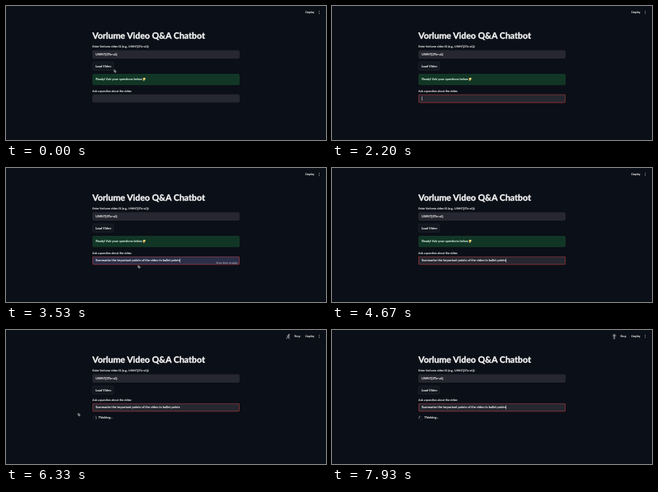
These frames come from a looping animation (400x168 px, 8 s). An HTML page:

```html
<!DOCTYPE html>
<html lang="en">
<head>
<meta charset="utf-8">
<title>Video Q&amp;A Chatbot</title>
<style>
html, body { margin: 0; width: 100%; height: 100%; overflow: hidden; background: #0b0f17; }

/* Laid out at four times the stage size, then scaled down. */
#app {
  position: absolute; left: 0; top: 0; width: 1600px; height: 672px;
  transform: scale(.25); transform-origin: 0 0;
  font: 500 16px Lato, "Open Sans", sans-serif; color: #fafafa;
  -webkit-text-stroke: .35px; text-rendering: geometricPrecision; white-space: nowrap;
}
#app div, #app svg { position: absolute; box-sizing: border-box; }
#app .t { line-height: 0; }
#app .small { font-size: 14.2px; }
.box { left: 432px; width: 736px; height: 42px; border-radius: 8px; background: #262730; }

h1 { position: absolute; margin: 0; left: 432px; top: 149px; line-height: 0; font-size: 43.7px; font-weight: 700; -webkit-text-stroke: 1.2px; }
#load { left: 432px; top: 280px; width: 107px; height: 42px; border: 1px solid #41444c; border-radius: 8px; background: #131720; }
#ready { left: 432px; top: 340px; width: 736px; height: 57px; border-radius: 8px; background: #123626; color: #dffde9; }
#hint { right: 8px; top: 30px; font-size: 12.2px; color: #a5a8b5; }

.caret { position: absolute; top: -10px; height: 20px; border-left: 2px solid #fafafa; }

#ready, #ask, #field, #first, #last, #query, #hint, #busy, #wait, #mouse { animation: 8s step-end infinite; }
#ready { animation-name: ready; }
#ask { left: 0; top: 0; animation-name: shift; }
#field { top: 443px; border: 2px solid transparent; animation-name: focus, autofill; animation-timing-function: linear, step-end; }
#first { animation-name: first; }
#last { animation-name: last; }
#query { animation-name: query; }
#hint { animation-name: hint; }
#busy, #wait { animation-name: busy; }
#mouse { left: 0; top: 0; overflow: visible; animation-name: seen, travel; animation-timing-function: step-end, linear; }

#ring {
  left: 434px; top: 431px; width: 19px; height: 19px; border-radius: 50%;
  border: 2.6px solid #30343d; border-top-color: #d0d2d6;
  animation: spin 1s -.9s linear infinite;
}
.pose { opacity: 0; animation: pose 666.667ms step-end infinite; animation-delay: calc(-870ms + var(--i) * 133.333ms); }

@keyframes ready { 0% { visibility: visible } 60.875%, 100% { visibility: hidden } }
@keyframes shift { 0% { transform: none } 60.875%, 100% { transform: translateY(-76px) } }
@keyframes focus { 0%, 14.125% { border-color: transparent } 17%, 100% { border-color: #ff4b4b } }
@keyframes autofill { 0% { background-color: #262730 } 38.375% { background-color: #2b2f47 } 57.5%, 100% { background-color: #262730 } }
@keyframes first { 0% { opacity: 0 } 14.125% { opacity: 1 } 20.875% { opacity: 0 } 27.5% { opacity: 1 } 34.125%, 100% { opacity: 0 } }
@keyframes last {
  0% { opacity: 0 } 44.125% { opacity: 1 } 50.875% { opacity: 0 } 57.5% { opacity: 1 } 64.125% { opacity: 0 }
  70.8% { opacity: 1 } 77.5% { opacity: 0 } 84.1% { opacity: 1 } 90.8% { opacity: 0 } 97.5%, 100% { opacity: 1 }
}
@keyframes query { 0% { visibility: hidden } 38.375%, 100% { visibility: visible } }
@keyframes hint { 0% { visibility: hidden } 44.125% { visibility: visible } 57.5%, 100% { visibility: hidden } }
@keyframes busy { 0% { visibility: hidden } 64.125%, 100% { visibility: visible } }
@keyframes seen {
  0% { visibility: visible } 4.125% { visibility: hidden } 34.125% { visibility: visible }
  46.625% { visibility: hidden } 64.125% { visibility: visible } 97.5%, 100% { visibility: hidden }
}
@keyframes travel {
  0%, .875% { transform: translate(541px, 319px) }
  4.125%, 5% { transform: translate(681px, 395px) }
  34.125% { transform: translate(661px, 453px) }
  36.625%, 46.625% { transform: translate(661px, 488px) }
  64.125% { transform: translate(469px, 495px) }
  67.5% { transform: translate(433px, 475px) }
  74.125%, 100% { transform: translate(361px, 417px) }
}
@keyframes spin { to { transform: rotate(360deg) } }
@keyframes pose { 0% { opacity: 1 } 20%, 100% { opacity: 0 } }
</style>
</head>
<body>
<div id="app">
  <div id="busy">
    <svg style="left:1399px;top:19px" width="24" height="26" viewBox="0 0 26 28" fill="none" stroke="#e8e9ec" stroke-width="2.8" stroke-linecap="round">
      <g class="pose" style="--i:0"><circle cx="13" cy="5" r="2"/><path d="M4 5l9 6 9-6M13 11v7l-6 6M13 18l6 6"/></g>
      <g class="pose" style="--i:1"><circle cx="13" cy="4" r="2"/><path d="M5 10h16M13 10v8l-2 8M13 18l2 8"/></g>
      <g class="pose" style="--i:2"><circle cx="13" cy="4" r="2"/><path d="M6 11l7-1 7 1M13 10v8l-2 8M13 18l2 8"/></g>
      <g class="pose" style="--i:3"><circle cx="14" cy="4" r="2"/><path d="M6 15l7-5 7 5M13 10v8l-5 7M13 18l5 7"/></g>
      <g class="pose" style="--i:4"><circle cx="17" cy="4" r="2"/><path d="M8 12l7-3 5 5M15 9l-3 8 6 3v6M12 17l-3 5-6 3"/></g>
    </svg>
    <div class="t small" style="left:1442px;top:32px">Stop</div>
  </div>
  <div class="t small" style="left:1497px;top:32px">Deploy</div>
  <svg style="left:1562px;top:22px" width="8" height="20" fill="#fafafa"><circle cx="4" cy="3" r="1.8"/><circle cx="4" cy="10" r="1.8"/><circle cx="4" cy="17" r="1.8"/></svg>

  <h1>Vorlume Video Q&amp;A Chatbot</h1>
  <div class="t small" style="left:432px;top:205px">Enter Vorlume video ID (e.g., UWNTj3To-uQ):</div>
  <div class="box" style="top:222px"><div class="t" style="left:16px;top:21px">UWNTj3To-uQ</div></div>
  <div id="load"><div class="t" style="left:14px;top:20px">Load Video</div></div>

  <div id="ready">
    <div class="t" style="left:17px;top:28px">Ready! Ask your questions below</div>
    <svg style="left:250px;top:19px" width="18" height="19" viewBox="0 0 20 21" fill="#f6d27a">
      <rect x="4" y="1" width="13" height="10" rx="4"/><rect x="5" y="5" width="4.5" height="15" rx="2.2"/>
      <path d="M10 11h6l-1 3h-5z" fill="#c99a45"/><path d="M4 4L1 9l2 3 3-3z"/>
    </svg>
  </div>

  <div id="ask">
    <div class="t small" style="left:432px;top:427px">Ask a question about the video:</div>
    <div class="box" id="field">
      <div class="t" style="left:14px;top:19px"><span class="caret" id="first"></span></div>
      <div class="t" id="query" style="left:14px;top:19px">Summarize the important points of the video in bullet points<span class="caret" id="last"></span></div>
      <div class="t" id="hint">Press Enter to apply</div>
    </div>
  </div>

  <div id="wait">
    <div id="ring"></div>
    <div class="t" style="left:462px;top:440px">Thinking...</div>
  </div>

  <svg id="mouse" width="11" height="16"><path d="M0 0V12l3-2.500 2.500 5 2.500-1-2.500-5h4z" fill="#333" stroke="#fff" stroke-width="2"/></svg>
</div>
</body>
</html>
```
